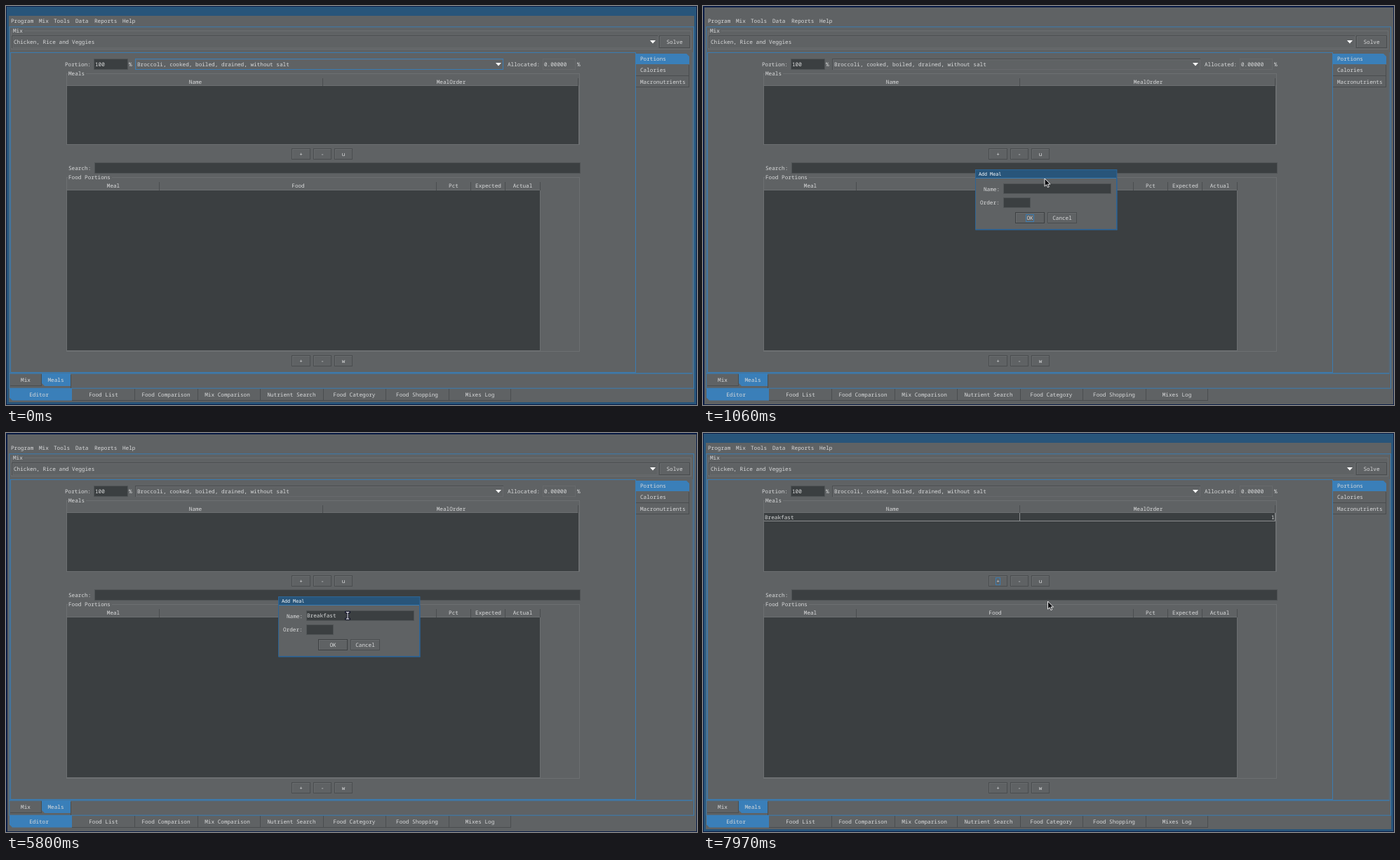
An HTML page for the animation above (8 s loop, 985 px wide and 569 px high).

```html
<!DOCTYPE html>
<html lang="en">
<head>
<meta charset="utf-8">
<title>Meal editor</title>
<style>
  html, body { margin: 0; width: 100%; height: 100%; overflow: hidden; background: #0a1c44; }
  svg { display: block; width: 985px; height: 569px; }
  rect { shape-rendering: crispEdges; }
  rect.soft { shape-rendering: geometricPrecision; }
  text {
    font: 7.7px "Noto Sans Mono", "DejaVu Sans Mono", monospace;
    text-rendering: geometricPrecision;
    white-space: pre;
    fill: #d9dadb;
  }
  text.caption { font: 6.7px "DejaVu Sans Mono", monospace; fill: #fff; }
</style>
</head>
<body>
<svg id="stage" viewBox="0 0 985 569"></svg>
<script>
const LOOP = 8000;
const CHAR = 4.62;
const C = {
  bg: '#5f6264', dark: '#3b3f41', edge: '#4a4d4f', soft: '#6c6f71',
  blue: '#3a7fb9', line: '#3a7cb2', title: '#28557a', navy: '#0a1c44', row: '#8b8e90'
};
const SOFT = 'class="soft"';

// Drawing helpers: boxes are given by their corners.
const rect = (x1, y1, x2, y2, fill, extra = '') =>
  `<rect x="${x1}" y="${y1}" width="${x2 - x1}" height="${y2 - y1}" fill="${fill}" ${extra}/>`;
const frame = (x1, y1, x2, y2, color, extra = '') =>
  rect(x1 + .5, y1 + .5, x2 - .5, y2 - .5, 'none', `stroke="${color}" ${extra}`);
const text = (s, x, y, anchor = 'start', extra = '') =>
  `<text x="${x}" y="${y + 2.8}" text-anchor="${anchor}" ${extra}>${s}</text>`;
const mid = (s, x, y) => text(s, x, y, 'middle');
const group = (id, body, shown = true) =>
  `<g id="${id}"${shown ? '' : ' visibility="hidden"'}>${body}</g>`;

const field = (x1, y1, x2, y2) => rect(x1, y1, x2, y2, C.dark) + frame(x1, y1, x2, y2, '#505456');
const button = (label, x1, y1, x2, y2, color = C.edge) =>
  frame(x1 + 1, y1 + 1, x2, y2, '#696c6e') + frame(x1, y1, x2, y2, color) +
  mid(label, (x1 + x2) / 2, (y1 + y2) / 2);
const arrowDown = (x, y) => `<path d="M${x - 4} ${y - 2}h8l-4 4.5z" fill="#fff"/>`;
const combo = (label, x1, y1, x2, y2) =>
  frame(x1, y1, x2, y2, C.edge) + frame(x1 + 1, y1 + 1, x2, y2, '#67696c') +
  text(label, x1 + 3, (y1 + y2) / 2) + arrowDown(x2 - 7, (y1 + y2) / 2);
const titled = (label, x1, y1, x2, y2) =>
  frame(x1, y1, x2, y2, C.soft) +
  rect(x1 + 2, y1 - 1, x1 + 5 + label.length * CHAR, y1 + 2, C.bg) + text(label, x1 + 3, y1);

const table = (x1, x2, top, head, bottom, cols) =>
  rect(x1, head, x2, bottom, C.dark) + frame(x1 - 1, head - 1, x2 + 1, bottom + 1, C.soft) +
  cols.map(([label, cx, right]) =>
    mid(label, cx, top + 6) + rect(right, top + 1, right + 1, head, C.edge)).join('');

const tabs = (names, centers, edges, y1, y2, active) => names.map((s, i) => {
  const a = edges[i], b = edges[i + 1];
  const shape = i === active
    ? `<path d="M${a} ${y1 - 1}H${b}V${y2}H${a + 4}L${a} ${y2 - 4}z" fill="${C.blue}"/>`
    : rect(b - 1, y1, b, y2, C.edge) + rect(a, y2 - 1, b, y2, C.edge);
  return shape + mid(s, centers[i], (y1 + y2) / 2);
}).join('');

function menuBar() {
  const items = { Program: 7, Mix: 47, Tools: 68, Data: 99, Reports: 126, Help: 166 };
  return Object.entries(items).map(([s, x]) => text(s, x, 21)).join('');
}

function sideTabs() {
  return `<path d="M898 68H970L974 72V83H898z" fill="${C.blue}"/>` +
    rect(898, 99, 974, 100, C.edge) + rect(898, 115, 974, 116, C.edge) +
    rect(973, 84, 974, 116, C.edge) +
    ['Portions', 'Calories', 'Macronutrients'].map((s, i) => text(s, 904, 75.3 + i * 16.3)).join('');
}

function mainWindow() {
  return rect(1, 1, 984, 568, C.title, 'id="border"') +
    rect(4, 14, 981, 565, C.bg) +
    menuBar() +
    frame(4.3, 29.3, 981, 545.7, C.line, SOFT) +
    titled('Mix', 7, 35, 977, 62) +
    combo('Chicken, Rice and Veggies', 8, 42, 929, 60) +
    button('Solve', 931, 42, 975, 60) +
    frame(6, 66, 898, 523, C.line) +
    rect(5, 523.2, 979, 524.6, C.line, SOFT) + rect(978, 66, 979, 524, '#4d6f8b') +
    sideTabs() +
    text('Portion:', 84, 83) + field(125, 75, 174, 91) + text('100', 127, 83) + text('%', 175, 83) +
    combo('Broccoli, cooked, boiled, drained, without salt', 184, 75, 709, 91) +
    group('comboFocus', frame(184, 75, 709, 91, C.line)) +
    text('Allocated:', 715, 83) + frame(765, 75, 812, 91, '#67696b') +
    text('0.00000', 767, 83) + text('%', 814, 83) +
    titled('Meals', 86, 96, 818, 198) +
    table(87, 816, 102, 114, 197, [['Name', 270, 451], ['MealOrder', 634.5, 815]]) +
    group('mealRow',
      rect(87, 125, 816, 126, C.row) + rect(451, 114, 452, 125, C.row) + rect(815, 114, 816, 125, C.row) +
      text('Breakfast', 88, 120) + text('1', 814.5, 120, 'end'), false) +
    group('plusPressed', rect(408, 204, 433, 218, '#74787c'), false) +
    button('+', 407, 203, 434, 219) + button('-', 438, 203, 464, 219) + button('u', 468, 203, 494, 219) +
    group('plusFocus', frame(417, 206, 424, 217, C.line), false) +
    text('Search:', 89, 231) + field(126, 223, 819, 239) +
    titled('Food Portions', 86, 244, 818, 493) +
    table(87, 761, 250, 263, 491, [
      ['Meal', 153, 218], ['Food', 416.5, 613], ['Pct', 638, 662],
      ['Expected', 687.5, 711], ['Actual', 736.5, 761]]) +
    button('+', 407, 498, 434, 514) + button('-', 438, 498, 464, 514) + button('w', 468, 498, 494, 514) +
    tabs(['Mix', 'Meals'], [28, 71], [6, 51, 92], 525, 542, 1) +
    rect(92, 526, 93, 545, C.edge) +
    tabs(['Editor', 'Food List', 'Food Comparison', 'Mix Comparison', 'Nutrient Search',
      'Food Category', 'Food Shopping', 'Mixes Log'],
      [47, 139, 228, 315.5, 407, 496.5, 586, 675.5],
      [5, 94, 184, 274, 363, 453, 542, 632, 720], 546, 562.5, 0);
}

function dialog() {
  return group('dialog',
    rect(389, 246, 589, 318, C.bg) +
    rect(589, 246, 590.4, 319.4, '#2d6596', SOFT) + rect(389, 318, 590.4, 319.4, '#2d6596', SOFT) +
    group('dialogTitle',
      rect(388, 233, 590, 246, C.title) + frame(388, 233, 590.4, 319.4, '#2d6596', SOFT) +
      rect(389, 245, 589, 246, C.line) +
      text('Add Meal', 393, 239.5, 'start', 'class="caption"')) +
    text('Name:', 400, 261) + field(428, 253, 582, 268) +
    text('Order:', 395, 280.5) + field(428, 273, 467, 288) +
    button('OK', 445, 294, 487, 310, '#3d4042') + button('Cancel', 491, 294, 533, 310) +
    group('okFocus', frame(460, 297, 472, 308, C.line)) +
    text('', 429, 260, 'start', 'id="name"') + text('', 429, 280, 'start', 'id="order"') +
    rect(0, 0, 1, 10, '#e4e5e6', 'id="caret"'), false);
}

const beamShape = 'd="M-2.4 -4.8H2.4M0 -4.8V4.8M-2.4 4.8H2.4" fill="none"';
const pointers =
  group('arrow', '<path d="M0 0V11.2L2.6 8.8L4.4 12.6L6.2 11.8L4.5 8.1H8z" fill="#0b0c10" stroke="#fff" stroke-width=".9"/>', false) +
  group('beam', `<path ${beamShape} stroke="#0b0c24" stroke-width="2.8" stroke-linecap="square"/>` +
    `<path ${beamShape} stroke="#fff" stroke-width="1"/>`, false);

document.getElementById('stage').innerHTML = mainWindow() + dialog() + pointers;

const names = 'border comboFocus mealRow plusPressed plusFocus dialog dialogTitle okFocus name order caret arrow beam';
const el = Object.fromEntries(names.split(' ').map(id => [id, document.getElementById(id)]));

// Steps: [start time, value...]; each holds until the next.
const nameSteps = [[0, ''], [2620, 'B'], [2880, 'Br'], [2930, 'Bre'], [3130, 'Brea'], [3410, 'Break'],
  [3720, 'Breakf'], [4040, 'Breakfs'], [4490, 'Breakf'], [4580, 'Breakfa'], [4670, 'Breakfas'],
  [4920, 'Breakfast']];
const orderSteps = [[0, ''], [6160, '0'], [6370, '01']];
const caretSteps = [[0, ''], [1430, 'name'], [1860, ''], [2410, 'name'], [5330, ''], [5370, 'order'],
  [5800, ''], [6160, 'order']];
const pointerSteps = [[0, ''],
  [810, 'arrow', 452.5, 231.5], [850, 'arrow', 471, 241], [890, 'arrow', 486, 247.5],
  [1060, 'arrow', 487, 246], [1100, 'arrow', 488, 248], [1140, 'arrow', 488.5, 251],
  [1180, 'beam', 489, 256], [1220, 'beam', 488.5, 259], [1260, 'beam', 488, 260.5],
  [1780, 'beam', 487, 260.3], [6690, 'arrow', 487, 259]];

// The pointer sweeps right, then loops back up and left.
const sweep = [[488, 259], [494, 260], [505, 260], [517, 257], [525, 252], [523, 247], [514, 243.5],
  [502, 241], [491.5, 240]];
sweep.forEach(([x, y], i) => pointerSteps.push([7640 + Math.round(i * 41.25), 'arrow', x, y]));

const at = (steps, t) => steps.findLast(s => s[0] <= t);
const show = (id, on) => el[id].setAttribute('visibility', on ? 'inherit' : 'hidden');
const within = (t, a, b) => t >= a && t < b;

function render(t) {
  const inactive = within(t, 580, 6750);
  el.border.setAttribute('fill', inactive ? C.bg : C.title);
  el.border.setAttribute('stroke', inactive ? C.navy : 'none');
  show('comboFocus', t < 500);
  show('plusPressed', within(t, 500, 640));
  show('plusFocus', within(t, 500, 640) || t >= 6790);
  show('mealRow', t >= 6750);
  show('dialog', within(t, 580, 6690));
  // A child must not outlive its hidden parent, so children inherit.
  show('dialogTitle', t >= 640);
  show('okFocus', within(t, 640, 1430));

  const typed = { name: at(nameSteps, t)[1], order: at(orderSteps, t)[1] };
  el.name.textContent = typed.name;
  el.order.textContent = typed.order;

  const focus = at(caretSteps, t)[1];
  show('caret', focus);
  if (focus) {
    el.caret.setAttribute('x', Math.round(429 + typed[focus].length * CHAR));
    el.caret.setAttribute('y', focus === 'name' ? 255 : 275);
  }

  const [, kind, x, y] = at(pointerSteps, t);
  for (const id of ['arrow', 'beam']) {
    show(id, id === kind);
    if (id === kind) el[id].setAttribute('transform', `translate(${x} ${y})`);
  }
}

const start = performance.now();
function tick() {
  render((performance.now() - start) % LOOP);
  requestAnimationFrame(tick);
}
tick();
</script>
</body>
</html>
```
